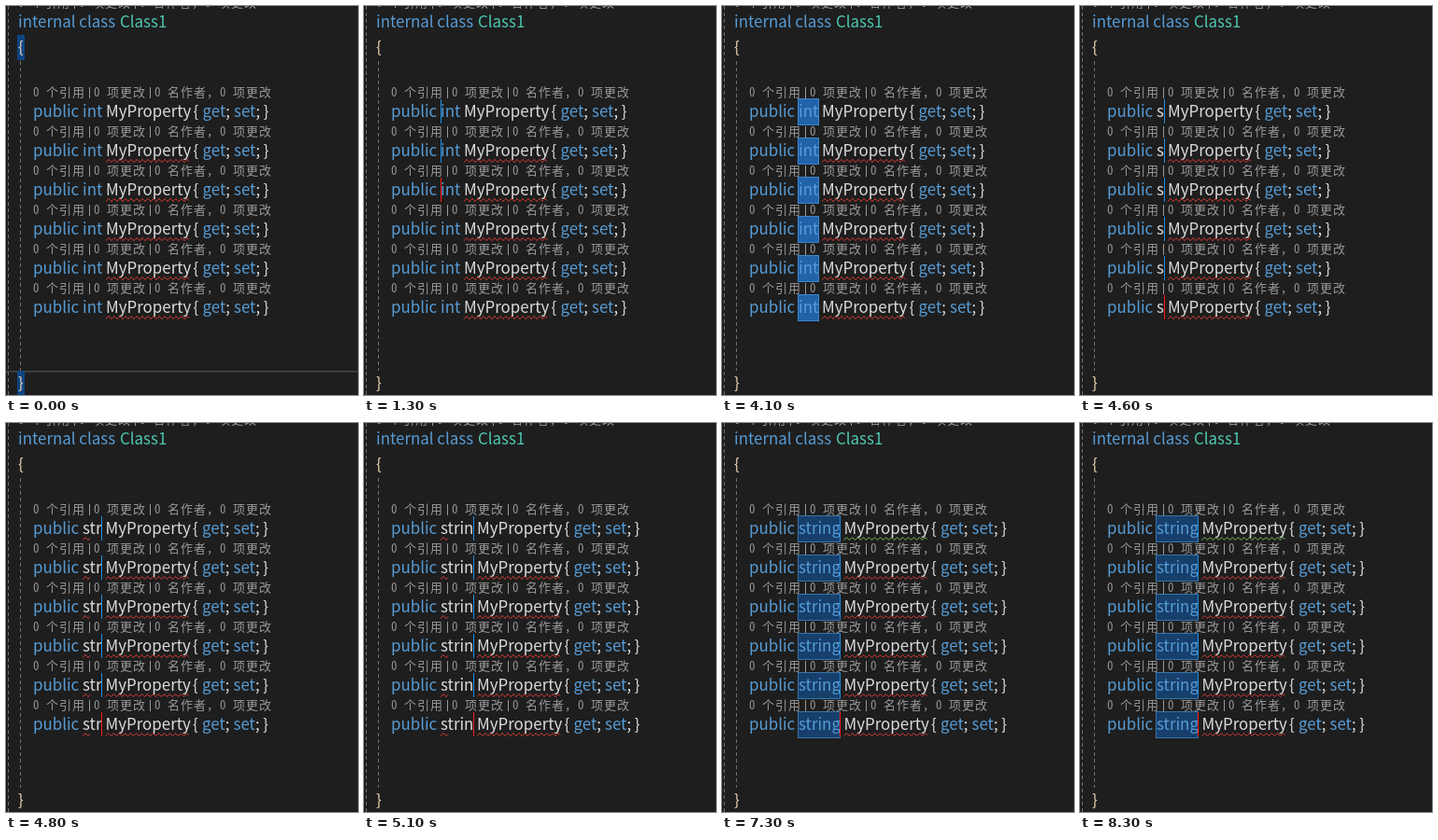
Write an HTML page with a canvas that moves like this. It is 377 px wide and 417 px high and loops after 8.5 s.

```html
<!DOCTYPE html>
<html lang="zh-CN">
<head>
<meta charset="utf-8">
<style>
  html, body { margin: 0; width: 100%; height: 100%; overflow: hidden; background: #1e1e1e; }
  canvas { display: block; }
</style>
</head>
<body>
<canvas id="stage" width="377" height="417"></canvas>
<script>
const ctx = document.getElementById('stage').getContext('2d');
const LOOP = 8500, ROWS = 6, TYPE_X = 82;
const CODE_FONT = '350 16.9px "Noto Sans CJK SC", "Noto Sans CJK JP", "Noto Sans CJK", sans-serif';
const LENS_FONT = '300 13px "Noto Sans Mono CJK SC", "Noto Sans CJK SC", "Noto Sans CJK", monospace';
const TIP_FONT = '700 13px "Noto Sans Mono", monospace';
const BLUE = '#569cd6', TEXT = '#dcdcdc', TEAL = '#4ec9b0', WARM = '#ecd3b2';
const RED = '#f04038', GREEN = '#7ccf62';

// left edge of the property name for each typed type
const NAME_X = { int: 107, s: 94, st: 100.5, str: 106.5, stri: 111, strin: 121, string: 130.5 };
const TYPING = [[0, 'int'], [4300, 's'], [4700, 'st'], [4800, 'str'],
                [5000, 'stri'], [5100, 'strin'], [5400, 'string']];
// number of rows covered by the column selection
const COVERED = [[0, 0], [900, 1], [1200, 2], [1300, 3], [1400, 4], [1700, 5], [2200, 6]];
const CARET = [[0, false], [900, true], [2500, false], [3100, true], [4000, false],
               [4300, true], [5900, false], [6400, true], [6800, false],
               [7300, true], [7800, false], [8300, true]];

const at = (steps, t) => steps.filter(s => s[0] <= t).pop()[1];
const within = (t, a, b) => t >= a && t < b;
const baseline = row => 119 + 42 * row;
const lineTop = row => baseline(row) - 19;

function rect(x, y, w, h, color) {
  ctx.fillStyle = color;
  ctx.fillRect(x, y, w, h);
}

function text(str, x, y, color) {
  ctx.fillStyle = color;
  ctx.fillText(str, x, y);
  return x + ctx.measureText(str).width;
}

function guide(x, top, bottom) {
  ctx.strokeStyle = '#707070';
  ctx.lineWidth = 1;
  ctx.setLineDash([4, 3]);
  ctx.beginPath();
  ctx.moveTo(x, top);
  ctx.lineTo(x, bottom);
  ctx.stroke();
  ctx.setLineDash([]);
}

function squiggle(x, width, y, color) {
  ctx.strokeStyle = color;
  ctx.lineWidth = 1;
  ctx.beginPath();
  for (let d = 0; d <= width; d += 0.5) {
    ctx.lineTo(x + d, y + 1.2 * Math.cos(d * Math.PI / 3));
  }
  ctx.stroke();
}

// code lens sits on a half-width / full-width character grid
function lens(x, y) {
  ctx.font = LENS_FONT;
  ['0 个引用', '0 项更改', '0 名作者，0 项更改'].forEach((part, i) => {
    let cx = x + 65 * i;
    for (const ch of part) {
      text(ch, cx, y, '#999999');
      cx += ch.charCodeAt(0) < 128 ? 7 : 14;
    }
    if (i < 2) rect(x + 65 * i + 60, y - 10, 1, 12, '#999999');
  });
}

function tips(row) {
  const y = baseline(row) - 53;
  ctx.font = TIP_FONT;
  ctx.textAlign = 'center';
  [[49, '2'], [109, '5'], [208, '7']].forEach(([x, key], i) => {
    rect(x, y, 18, 20, i ? '#999999' : '#383838');
    text(key, x + 9, y + 15, i ? '#1e1e1e' : '#7c7c7c');
  });
  ctx.textAlign = 'left';
}

function selection(row, t, caretX) {
  const top = lineTop(row);
  const outlined = (fill, edge) => {
    rect(TYPE_X - 1, top - 1, caretX - TYPE_X + 2, 29, edge);
    rect(TYPE_X, top, caretX - TYPE_X, 27, fill);
  };
  if (within(t, 2500, 3600)) rect(TYPE_X, top, 16, 27, '#264f78');
  else if (within(t, 3600, 4100)) rect(TYPE_X, top, 21, 27, '#264f78');
  else if (within(t, 4100, 4300)) outlined('#2162a8', '#3c86cc');
  else if (t >= 6100) outlined('#173f6c', '#3a74aa');
}

function property(row, t, type, caretX) {
  const y = baseline(row), x = NAME_X[type];
  const whole = type === 'int' || type === 'string';
  selection(row, t, caretX);
  lens(29, y - 22);
  ctx.font = CODE_FONT;
  text('public', 29, y, BLUE);
  text(type, TYPE_X, y, whole ? BLUE : TEXT);
  text('MyProperty', x, y, TEXT);
  text('{', x + 93.5, y, TEXT);
  text(';', text('get', x + 103.5, y, BLUE), y, TEXT);
  text(';', text('set', x + 137, y, BLUE), y, TEXT);
  text('}', x + 168.7, y, TEXT);
  if (row) squiggle(x, 89, y + 5, RED);
  else if (t >= 5900) squiggle(x, 89, y + 5, GREEN);
  if (within(t, 4800, 5900)) squiggle(TYPE_X, 8, y + 5, RED);
}

function carets(t, covered, caretX) {
  if (!at(CARET, t)) return;
  const x = t < 2500 ? TYPE_X : t < 3600 ? 97 : caretX;
  for (let row = 0; row < covered; row++) {
    rect(x, lineTop(row), 1, 26, row === covered - 1 ? '#ff1a1a' : '#1c90e8');
  }
}

function draw(t) {
  rect(0, 0, 377, 417, '#1e1e1e');
  guide(2.5, 0, 417);
  guide(15.5, 59, 391);
  if (t < 900) {
    rect(0, 391, 377, 1.5, '#464646');
    rect(12, 31, 8, 27, '#0e4583');
    rect(12, 391, 8, 26, '#0e4583');
  }
  lens(13, 1);
  ctx.font = CODE_FONT;
  text('internal class', 13, 23, BLUE);
  text('Class1', 122, 23, TEAL);
  text('{', 13, 50, WARM);
  text('}', 13, 410, WARM);

  const type = at(TYPING, t), covered = at(COVERED, t);
  const caretX = Math.round(NAME_X[type] - 4.5);
  for (let row = 0; row < ROWS; row++) property(row, t, type, caretX);
  carets(t, covered, caretX);
  if (within(t, 1700, 2600) || within(t, 4000, 4100)) tips(covered - 1);
}

const start = performance.now();
function frame() {
  draw((performance.now() - start) % LOOP);
  requestAnimationFrame(frame);
}
frame();
</script>
</body>
</html>
```
